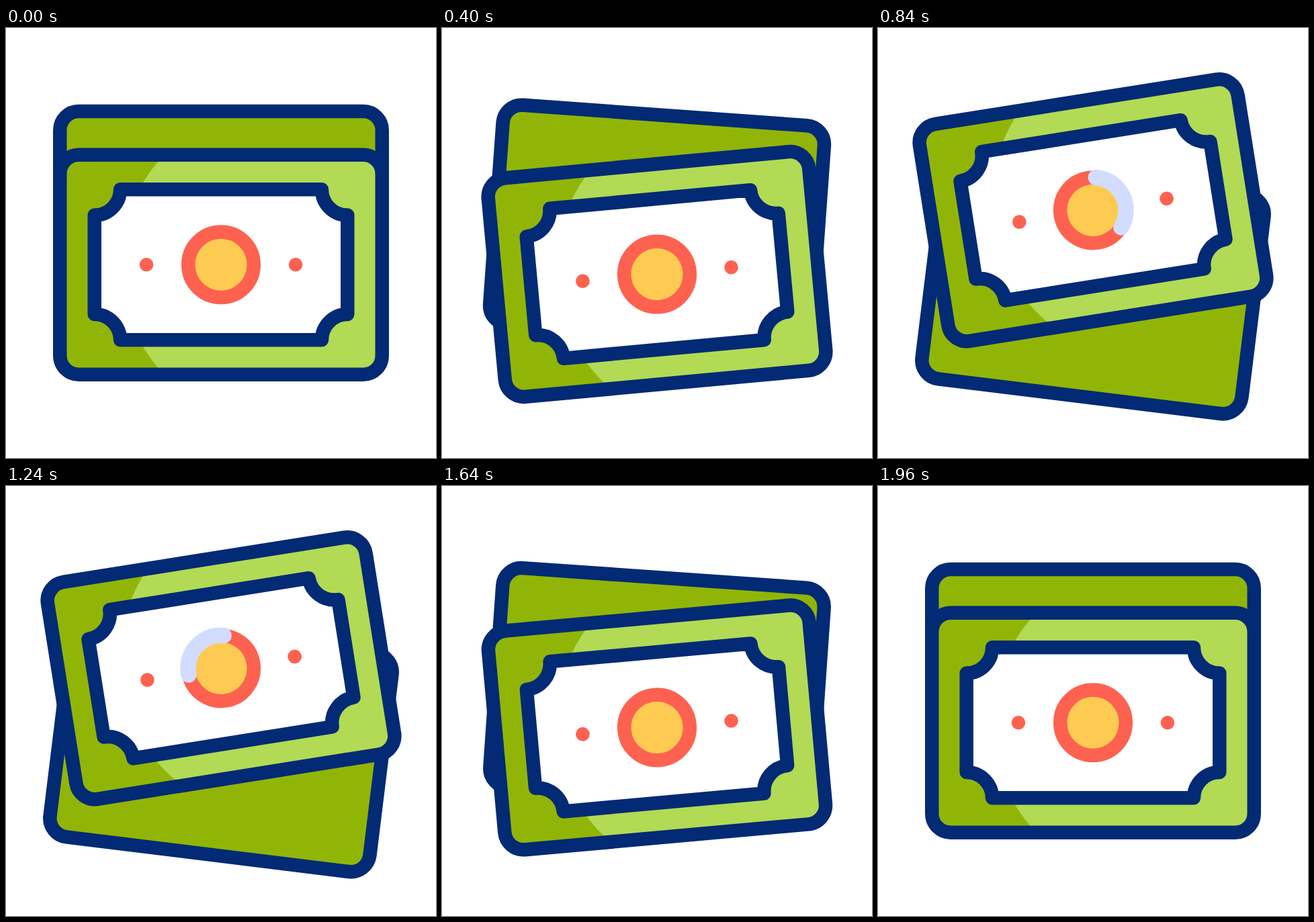
An HTML page that plays this animation: 640 px wide and 640 px high, repeating every 2 s.

```html
<!DOCTYPE html>
<html lang="en">
<head>
<meta charset="utf-8">
<title>Banknotes</title>
<style>
  html, body { margin: 0; width: 100%; height: 100%; overflow: hidden; background: #fff; }
  svg { display: block; width: 100%; height: 100%; }
  .line { stroke: #032a74; stroke-width: 20.5; stroke-linejoin: round; }
  .dark { fill: #91b507; }
  .light { fill: #b2da54; }
  .coral { fill: #fd6250; }
</style>
</head>
<body>
<svg viewBox="0 0 640 640">
  <defs>
    <rect id="card" x="-239.75" y="-163.5" width="479.5" height="327" rx="28"/>
    <clipPath id="inCard"><use href="#card"/></clipPath>
  </defs>
  <g id="back">
    <use href="#card" class="dark line"/>
  </g>
  <g id="front">
    <use href="#card" class="dark"/>
    <g clip-path="url(#inCard)"><circle class="light" cx="87" r="237"/></g>
    <use href="#card" class="line" fill="none"/>
    <path class="line" fill="#fff" d="M-150 -112H150A38.3 38.3 0 0 0 188.3 -73.7V73.7A38.3 38.3 0 0 0 150 112H-150A38.3 38.3 0 0 0 -188.3 73.7V-73.7A38.3 38.3 0 0 0 -150 -112Z"/>
    <circle class="coral" cx="-111" r="10.3"/>
    <circle class="coral" cx="111" r="10.3"/>
    <circle r="48.8" fill="#fdca52" stroke="#fd6250" stroke-width="20.5"/>
    <circle id="shine" r="49" fill="none" stroke="#d2dcfe" stroke-width="23.4"
      stroke-linecap="round" pathLength="1" transform="rotate(-76)"/>
  </g>
</svg>
<script>
  const LOOP = 2000, STEP = 40;
  const [back, front, shine] = ['back', 'front', 'shine'].map(id => document.getElementById(id));

  // Tracks are [time, value] pairs, eased between neighbours
  const turn = [[83.3, 0], [650, 1], [1383.3, 1], [1950, 0]];
  const shift = (peak, end) =>
    [[83.3, 0], [298, peak], [560, end], [1486, end], [1753, peak], [1955, 0]];
  const frontY = shift(62.5, -81);
  const backY = shift(-41.5, 98.4);
  const shineHead = [[650, 0], [1150, 1]];
  const shineTail = [[920, 0], [1420, 1]];

  const ease = s => s * s * (3 - 2 * s);

  function at(track, t) {
    if (t <= track[0][0]) return track[0][1];
    for (let i = 1; i < track.length; i++) {
      const [t0, a] = track[i - 1], [t1, b] = track[i];
      if (t < t1) return a + (b - a) * ease((t - t0) / (t1 - t0));
    }
    return track[track.length - 1][1];
  }

  function place(el, y, angle) {
    el.setAttribute('transform', `translate(320 ${y}) rotate(${angle})`);
  }

  function draw(t) {
    const k = at(turn, t);
    place(back, 287.5 + at(backY, t), 7 * k);
    place(front, 352.3 + at(frontY, t), -9 * k);

    const tail = at(shineTail, t), length = at(shineHead, t) - tail;
    shine.style.display = length > 0.001 ? '' : 'none';
    shine.setAttribute('stroke-dasharray', `${length} 2`);
    shine.setAttribute('stroke-dashoffset', -tail);
  }

  const start = performance.now();
  function tick() {
    const t = (performance.now() - start) % LOOP;
    const step = Math.floor(t / STEP) * STEP;
    draw(step >= LOOP - STEP ? 0 : step);
    requestAnimationFrame(tick);
  }
  tick();
</script>
</body>
</html>
```
